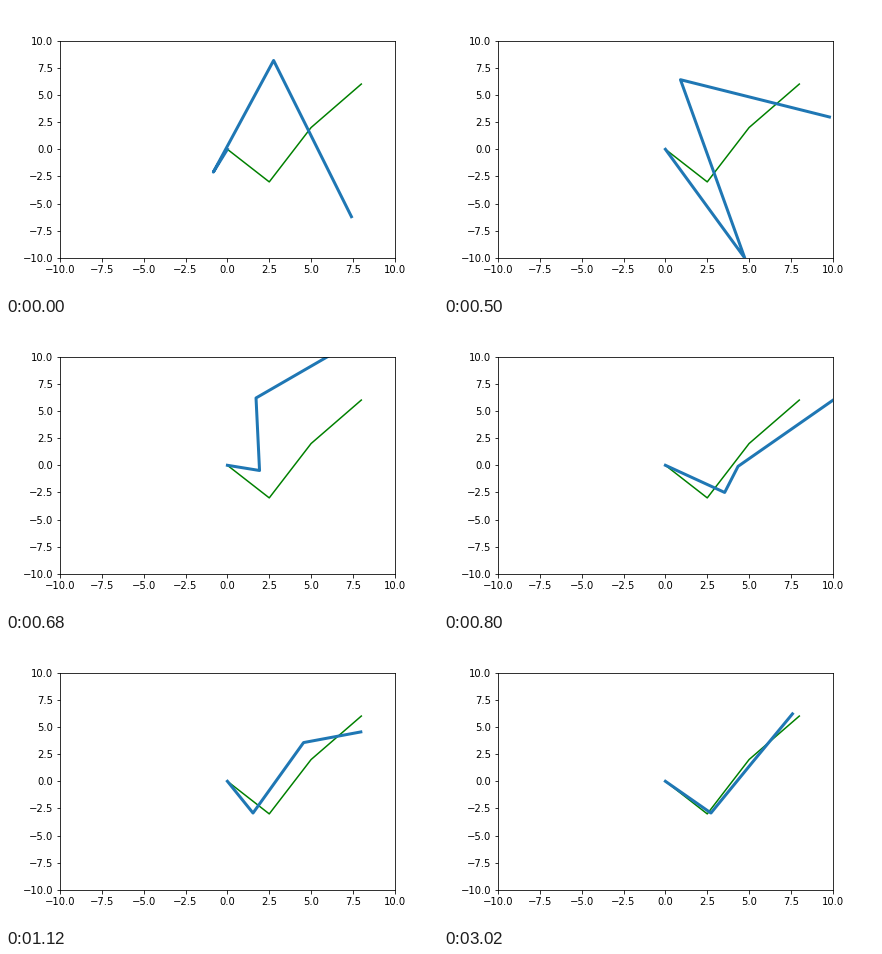
Write a matplotlib script that moves like this. It is 432 px wide and 288 px high and loops after 3.98 s.

```python
import numpy as np
import matplotlib.pyplot as plt
from matplotlib.animation import FuncAnimation

STEP_MS = 20
LOOP_MS = 3980

TARGET = [(0, 0), (2.5, -3), (5, 2), (8, 6)]

# Times in ms at which the search finds a better arm.
IMPROVEMENTS = [0, 300, 500, 600, 680, 700, 800, 880, 940, 1120, 1160, 1280, 3020]

# Free joints at the turning points of the search; the rest are eased between.
KEY_POSES = {
    0: [(-0.84, -2.1), (2.76, 8.17), (7.41, -6.2)],
    300: [(-0.7, 1.5), (6.5, 10.3), (11, 5)],
    500: [(4.74, -10), (0.9, 6.4), (9.8, 2.97)],
    680: [(1.92, -0.48), (1.71, 6.19), (7.5, 11.34)],
    800: [(3.54, -2.5), (4.34, -0.1), (10.6, 6.62)],
    1120: [(1.53, -2.92), (4.55, 3.56), (7.97, 4.54)],
    1280: [(2.33, -3.33), (5.34, 1.88), (7.77, 4.95)],
    3020: [(2.72, -2.92), (5.2, 1.75), (7.59, 6.2)],
}


def arm_at(ms):
    """Joints of the best arm so far, held until the next improvement."""
    found = max(t for t in IMPROVEMENTS if t <= ms)
    start = max(t for t in KEY_POSES if t <= found)
    end = min((t for t in KEY_POSES if t > found), default=LOOP_MS)
    ease = ((found - start) / (end - start)) ** 2
    a = np.array(KEY_POSES[start])
    b = np.array(KEY_POSES.get(end, a))
    return np.vstack([(0, 0), a + (b - a) * ease])


fig, ax = plt.subplots(figsize=(6, 4), dpi=72, facecolor="white")
fig.subplots_adjust(left=0.125, right=0.9, bottom=0.125, top=0.88)
ticks = np.arange(-10, 10.1, 2.5)
ax.set(xlim=(-10, 10), ylim=(-10, 10), xticks=ticks, yticks=ticks)

ax.plot(*zip(*TARGET), color="green", lw=1.5)
arm, = ax.plot([], [], color="tab:blue", lw=3)


def draw(frame):
    arm.set_data(*arm_at(frame * STEP_MS).T)
    return arm,


anim = FuncAnimation(fig, draw, frames=LOOP_MS // STEP_MS,
                     interval=STEP_MS, repeat=True, blit=False)
plt.show()
```
